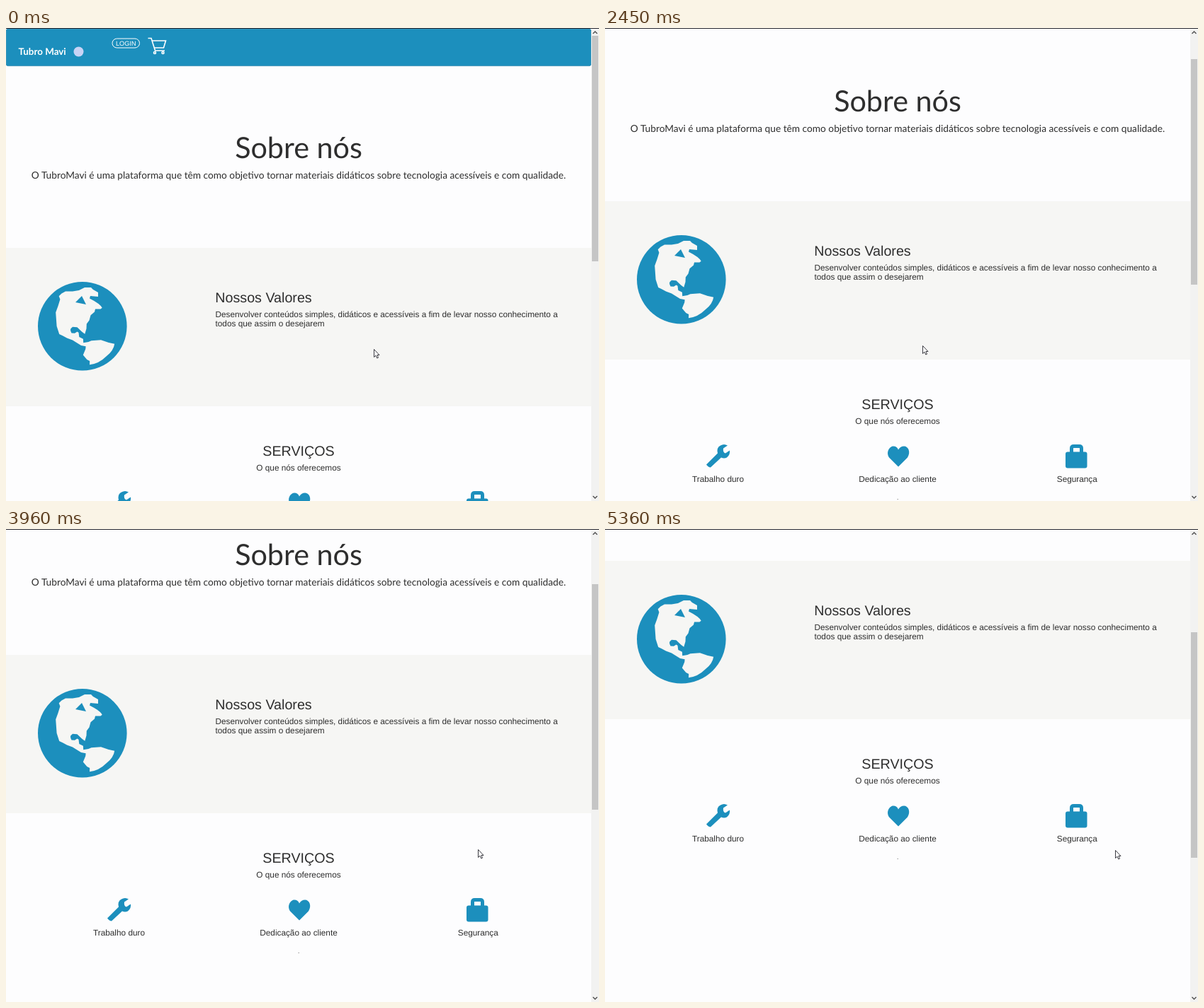
These frames come from a looping animation (837x669 px, 5480 ms). An HTML page:

```html
<!DOCTYPE html>
<html lang="pt">
<head>
<meta charset="utf-8">
<style>
  html, body { margin: 0; width: 100%; height: 100%; overflow: hidden; background: #fdfdfe; }
  svg { display: block; width: 837px; height: 669px; }
  text { font: 11.8px "Liberation Sans", Arial, sans-serif; fill: #2e2e2e; text-rendering: geometricPrecision; }
  .mid { text-anchor: middle; }
  .h2 { font-size: 19.7px; }
  .lato { font-family: Lato, sans-serif; }
  .h1 { font-size: 41.3px; }
  .lead { font-size: 13.72px; }
  .brand { font-size: 13.4px; font-weight: 700; fill: #fff; }
  .login { font-size: 9.2px; fill: #fff; }
  .blue { fill: #1c8fbd; }
  .line { fill: none; stroke: #fff; }
</style>
</head>
<body>
<svg viewBox="0 0 837 669">
  <g id="page">
    <rect x=".3" y="1.3" width="825.4" height="52.300" rx="2.600" class="blue" stroke="#1a7ba5" stroke-width=".66"/>
    <text x="17.5" y="38" class="lato brand">Tubro Mavi</text>
    <circle cx="102.5" cy="33.5" r="7" fill="#c8d3f5"/>
    <rect x="150" y="15" width="38.5" height="13" rx="6.5" class="line"/>
    <text x="169.3" y="25" class="mid login">LOGIN</text>
    <g class="line" stroke-width="1.6">
      <path d="M200.5 14.500h4.500l5.500 17.500h13.500M206 18h19.500l-3 10h-13.500"/>
      <circle cx="210" cy="35" r="1.500"/>
      <circle cx="221.500" cy="35" r="1.500"/>
    </g>

    <text x="413" y="183.700" class="mid lato h1">Sobre nós</text>
    <text x="413" y="212.800" class="mid lato lead">O TubroMavi é uma plataforma que têm como objetivo tornar materiais didáticos sobre tecnologia acessíveis e com qualidade.</text>

    <rect y="311" width="826" height="224" fill="#f6f6f4"/>
    <circle cx="107.800" cy="421.800" r="62.800" class="blue"/>
    <path fill="#f6f6f4" fill-rule="evenodd" d="M111 367L103 371L94 372.400L84 372.600L78.500 375.500L74.700 379.300L76.400 383.700L73.400 393.600L70.200 402.200L71.600 421.800L75.200 433L80 435.300L86 438.400L94 441.400L106 449L112.600 450.200L112.300 454L108.800 462.400L114.300 469L118.200 471L118 476.200Q131 475 142 464Q152 456 153.200 446.700L145 445L134 441.300L120.500 442.200L116.400 444L109.200 445.300L108.900 439.800L103.300 437L102.500 430.800L100.500 429.500L97 431.800L92.500 431.400Q90 427 91.600 425L94 422.700L100.500 423.300L107 429.600L111.300 432.700L113.500 425.300L113.800 418.600L117.500 413.500L119.500 406.300L125 401.500L126 397.500L133.400 397.400L135.700 395.700Q133 390 118 382.400L119 379L130 380V374L123 370L120 367ZM98 388L107 379L113 391Z"/>
    <text x="295.300" y="387.500" class="h2">Nossos Valores</text>
    <text x="295.500" y="409">Desenvolver conteúdos simples, didáticos e acessíveis a fim de levar nosso conhecimento a</text>
    <text x="295.500" y="422">todos que assim o desejarem</text>

    <text x="413" y="604.900" class="mid h2">SERVIÇOS</text>
    <text x="413" y="626.300" class="mid">O que nós oferecemos</text>
    <g class="blue" transform="translate(0 65.400)">
      <path d="M143 618L159 602Q157 594 163 591Q168 588 173 591L167 595Q166 601 170 602L176 598Q177 604 172 608Q168 610 164 608L149 622Q146 622 143 618Z"/>
      <path d="M414 621L401 608C396 600 402 592 407 592Q412 592 414 597Q417 592 422 592C428 592 432 600 427 608Z"/>
      <rect x="650" y="600" width="30.500" height="23" rx="3"/>
      <path d="M658.500 602V595Q658.500 592 661.500 592H669.500Q672.500 592 672.500 595V602" fill="none" stroke="#1c8fbd" stroke-width="5"/>
    </g>
    <text x="159.500" y="708" class="mid">Trabalho duro</text>
    <text x="413" y="708" class="mid">Dedicação ao cliente</text>
    <text x="666.300" y="708" class="mid">Segurança</text>
    <rect x="412.500" y="732" width="1.500" height="1" fill="#999"/>
  </g>

  <rect x="826" width="11" height="669" fill="#f2f2f1"/>
  <rect id="thumb" x="827" y="11" width="9" height="319" fill="#c5c5c5"/>
  <path d="M828.500 8l3-3l3 3M828.500 662l3 3l3-3" fill="none" stroke="#505050" stroke-width="1.400"/>
  <rect width="837" height="1" fill="#24242c"/>
  <path id="cursor" d="M0 0V11L2.500 8.700L4.300 12.500L6 11.700L4.400 8H7.500Z" fill="#fff" stroke="#26262e" stroke-width=".9"/>
</svg>
<script>
const LOOP = 5480;
const page = document.getElementById("page");
const thumb = document.getElementById("thumb");
const cursor = document.getElementById("cursor");

// [start ms, scroll offset]
const scrolls = [[0, 0], [2210, 33], [2450, 66], [2680, 100], [2910, 133],
  [4430, 171], [4660, 211], [4890, 251], [5130, 266]];

// [start ms, x, y] of the pointer tip
const moves = [[0, 519, 454], [1050, 497, 545], [1165, 462, 631], [1280, 431, 592],
  [1395, 436, 497], [1510, 447, 449], [1630, 444, 448], [1980, 448, 449]];

const GLIDE = 7;
for (let i = 1; i <= GLIDE; i++) {
  const p = i / GLIDE, ease = p * p * (3 - 2 * p);
  moves.push([3500 + (i - 1) * 115, 448 + 272 * ease, 449 + 5 * ease]);
}

const at = (steps, t) => steps.findLast(step => step[0] <= t);

function draw(now) {
  const t = now % LOOP;
  const scroll = at(scrolls, t)[1];
  const [, x, y] = at(moves, t);
  page.setAttribute("transform", `translate(0 ${-scroll})`);
  thumb.setAttribute("y", 11 + Math.round(scroll * 0.507));
  cursor.setAttribute("transform", `translate(${Math.round(x) + .5} ${Math.round(y) + .5})`);
}

const start = performance.now();
function tick() {
  draw(performance.now() - start);
  requestAnimationFrame(tick);
}
tick();
</script>
</body>
</html>
```
